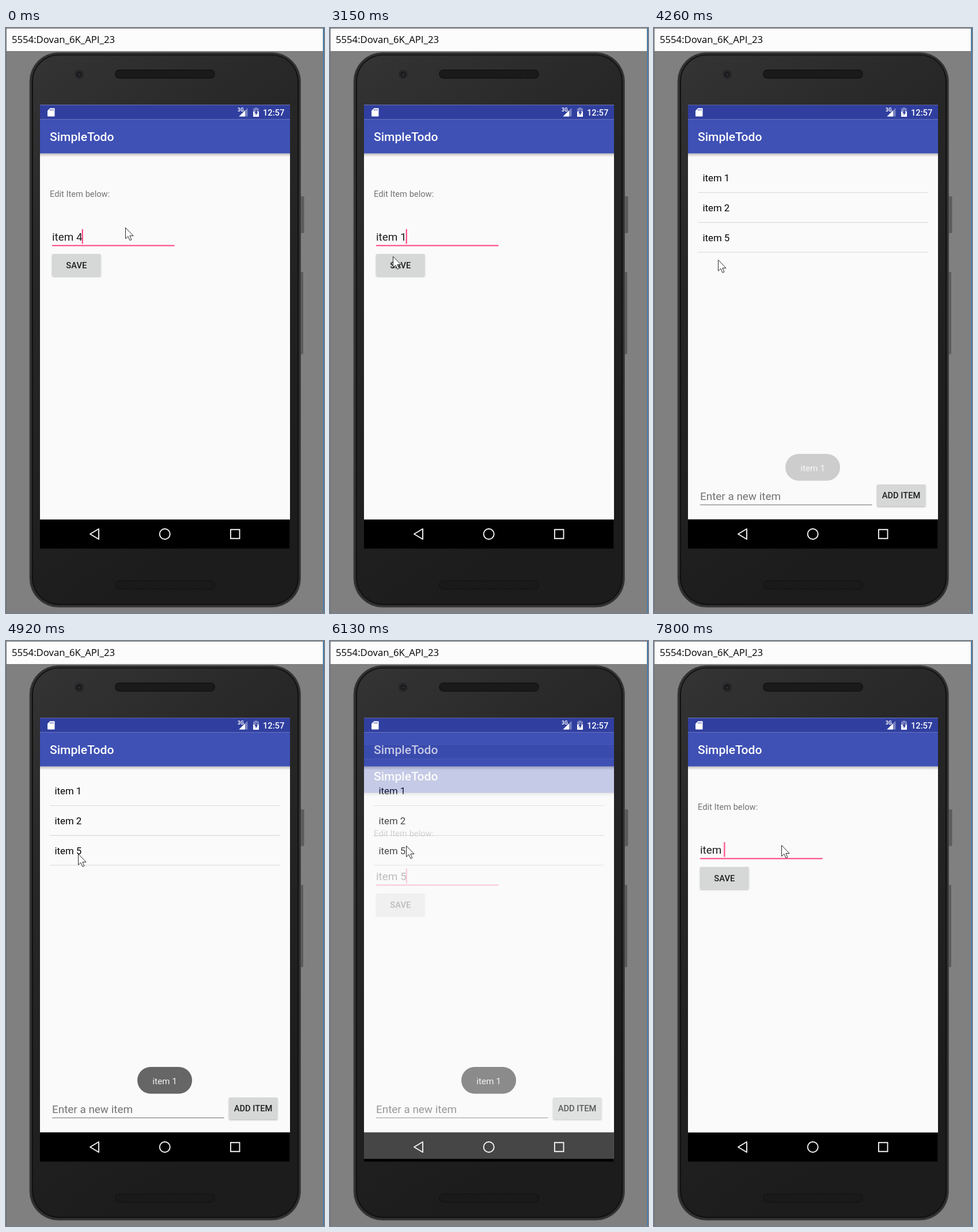
Write an HTML page that moves like this. It is 552x1015 px and loops after 8000 ms.

```html
<!DOCTYPE html>
<html lang="en">
<head>
<meta charset="utf-8">
<title>Todo app in an emulator</title>
<style>
html, body { margin: 0; width: 100%; height: 100%; overflow: hidden; background: #808080; }
svg { display: block; width: 100%; height: 100%; }
text { font-family: Roboto, sans-serif; white-space: pre; }
.medium { font-weight: 500; }
.small { font-size: 14.7px; }
.row { font-size: 16.8px; }
.field { font-size: 18.9px; }
.mid { text-anchor: middle; }
.window-title { font: 16.7px "Open Sans", "Noto Sans", sans-serif; }

.anim { animation: 8s step-end infinite; }
#pointer { animation-name: pointer; }
#caret { animation-name: caret; }
#list { animation-name: list; }
#edit { animation-name: edit; }
#toast { animation-name: toast; }
#save { animation-name: press; }
#old { animation-name: old; }
#typed { animation-name: typed; }
#next { animation-name: next; }

@keyframes pointer {
  0% { transform: translate(207px, 346px); }
  30.625% { transform: translate(207px, 343px); }
  32.125% { transform: translate(207px, 348px); }
  34% { transform: translate(114px, 376px); }
  35.875% { transform: translate(106px, 384px); }
  37.5% { transform: translate(104px, 387px); }
  39.375% { transform: translate(109px, 396px); }
  40.875% { transform: translate(111px, 400px); }
  44.25% { transform: translate(111px, 402px); }
  56.625% { transform: translate(112px, 399px); }
  58.25% { transform: translate(114px, 394px); }
  60% { transform: translate(120px, 380px); }
  61.5% { transform: translate(125px, 369px); }
  63% { transform: translate(129px, 362px); }
  64.5% { transform: translate(132px, 354px); }
  66.375% { transform: translate(132px, 365px); }
  67.875% { transform: translate(132px, 355px); }
  78.5% { transform: translate(144px, 355px); }
  80.125% { transform: translate(152px, 361px); }
  81.875% { transform: translate(166px, 370px); }
  83.375% { transform: translate(174px, 367px); }
  85.25% { transform: translate(219px, 354px); }
  87.125%, 100% { transform: translate(221px, 354px); }
}
@keyframes caret {
  0%, 23.625%, 35.875%, 76.625%, 88.625% { opacity: 1; transform: none; }
  5.375%, 17.875%, 30.625%, 42.375%, 81.875%, 95.625% { opacity: 0; transform: none; }
  10.5%, 97.5%, 100% { opacity: 1; transform: translateX(-10.4px); }
}
@keyframes old {
  0% { opacity: 1; }
  10.5%, 100% { opacity: 0; }
}
@keyframes typed {
  0%, 75.125%, 100% { opacity: 0; }
  23.625% { opacity: 1; }
}
@keyframes next {
  0%, 97.5%, 100% { opacity: 0; }
  75.125% { opacity: 1; }
}
@keyframes press {
  0%, 42.375%, 100% { fill: #d6d7d7; }
  40.875% { fill: #c6c7c7; }
}
@keyframes list {
  0%, 51.375%, 100% { opacity: 1; }
  48% { opacity: .7; }
}
@keyframes edit {
  0%, 80.125%, 100% { opacity: 1; transform: none; }
  49.5% { opacity: .92; transform: translateY(3px); }
  51.375% { opacity: 0; transform: none; }
  76.625% { opacity: .28; transform: translateY(46px); }
  78.5% { opacity: 1; transform: translateY(1px); }
}
@keyframes toast {
  0%, 80.125%, 100% { opacity: 0; }
  53.25% { opacity: .3; }
  55% { opacity: .85; }
  56.625% { opacity: 1; }
  76.625% { opacity: .75; }
  78.5% { opacity: .25; }
}
</style>
</head>
<body>
<svg viewBox="0 0 552 1015">
  <defs>
    <linearGradient id="body" x2=".35" y2="1">
      <stop stop-color="#343435"/><stop offset=".35" stop-color="#272728"/><stop offset="1" stop-color="#1c1c1c"/>
    </linearGradient>
    <linearGradient id="shade" x2="0" y2="1">
      <stop stop-color="#000" stop-opacity=".25"/><stop offset="1" stop-color="#000" stop-opacity="0"/>
    </linearGradient>
    <pattern id="holes" width="4" height="4" patternUnits="userSpaceOnUse">
      <circle cx="1" cy="1" r=".7" fill="#303030"/><circle cx="3" cy="3" r=".7" fill="#303030"/>
    </pattern>
    <filter id="raise" x="-10%" y="-10%" width="120%" height="130%">
      <feDropShadow dx="0" dy="1.2" stdDeviation=".9" flood-opacity=".28"/>
    </filter>
    <clipPath id="screen"><path d="M59 133.400H492.200V903.300H59Z"/></clipPath>
    <g id="grille">
      <rect x="189" y="72" width="174" height="16" rx="8" fill="#151515"/>
      <rect x="191" y="74" width="170" height="12" rx="6" fill="url(#holes)"/>
    </g>
    <g id="page">
      <path d="M59 133.400H493V852.400H59Z" fill="#fafafa"/>
      <path d="M59 217H493V224H59Z" fill="url(#shade)"/>
      <path d="M59 133.400H493V158.500H59Z" fill="#303f9f"/>
      <path d="M59 158.500H493V217.500H59Z" fill="#3f51b5"/>
      <text class="medium" x="76" y="196" font-size="21.050" fill="#fff">SimpleTodo</text>
    </g>
  </defs>

  <!-- emulator window -->
  <path d="M0 0H552V1015H0Z" fill="#808080"/>
  <path d="M1 1H550V40H1Z" fill="#fcfcfc"/>
  <path d="M0 .5H552M.5 0V1015" stroke="#707070"/>
  <path d="M550.5 0V1015" stroke="#6d7a86"/>
  <path d="M551.5 0V1015" stroke="#2f82c4"/>
  <text class="window-title" x="10" y="25.500">5554:Dovan_6K_API_23</text>

  <!-- handset -->
  <rect x="510" y="292" width="7.500" height="64" rx="2" fill="#5c5c5c"/>
  <rect x="510" y="423" width="6" height="143" rx="2" fill="#5c5c5c"/>
  <rect x="41" y="42.500" width="470.500" height="962.500" rx="50" fill="#2f2f2f" stroke="#4c4c4c"/>
  <rect x="45" y="46" width="463" height="955" rx="47" fill="#101010"/>
  <rect x="47" y="47.500" width="459" height="951.500" rx="45" fill="url(#body)"/>
  <use href="#grille"/>
  <use href="#grille" y="886.500"/>
  <circle cx="127" cy="80.500" r="8" fill="#262628"/>
  <circle cx="127" cy="80.500" r="4.500" fill="#19191b"/>
  <circle cx="127.500" cy="81" r="1.800" fill="#30343a"/>

  <g clip-path="url(#screen)">
    <path d="M59 133H493V904H59Z"/>

    <g id="list" class="anim">
      <use href="#page"/>
      <g class="row">
        <text x="84.500" y="266">item 1</text>
        <text x="84.500" y="318">item 2</text>
        <text x="84.500" y="369.800">item 5</text>
      </g>
      <path d="M76 285.500H475.500M76 337.300H475.500M76 389H475.500" stroke="#d9d9d9" stroke-width="1.200"/>
      <text class="field" x="80" y="819" fill="#737373">Enter a new item</text>
      <path d="M80 827.300H378.500" stroke="#878787" stroke-width="1.200"/>
      <rect x="387" y="792" width="84.500" height="38" rx="2" fill="#d6d7d7" filter="url(#raise)"/>
      <text class="small medium mid" x="429" y="816.300" fill="#1e1e1e">ADD ITEM</text>
    </g>

    <g id="edit" class="anim">
      <use href="#page"/>
      <text class="small" x="76" y="292.500" fill="#737373">Edit Item below:</text>
      <g class="field" fill="#1e1e1e">
        <text x="80" y="369">item</text>
        <text id="old" class="anim" x="122" y="369">4</text>
        <text id="typed" class="anim" x="122" y="369">1</text>
        <text id="next" class="anim" x="122" y="369">5</text>
      </g>
      <path d="M80 377.500H292.500" stroke="#ff4081" stroke-width="2.100"/>
      <path id="caret" class="anim" d="M132.700 349V374.500" stroke="#ff4081" stroke-width="2.100"/>
      <rect id="save" class="anim" x="80" y="392" width="84.500" height="38.500" rx="2" fill="#d6d7d7" filter="url(#raise)"/>
      <text class="small medium mid" x="122.300" y="416.700" fill="#1e1e1e">SAVE</text>
    </g>

    <g id="toast" class="anim" opacity="0">
      <rect x="228" y="739" width="95" height="46.500" rx="23.200" fill="#666"/>
      <text class="mid" x="275.500" y="768.500" font-size="15.300" fill="#f2f2f2">item 1</text>
    </g>

    <!-- system bars -->
    <g fill="#fff">
      <path d="M76.500 139H83.500Q84.500 139 84.500 140V152.500Q84.500 153.500 83.500 153.500H73Q72 153.500 72 152.500V143.500Z"/>
      <path d="M76.700 140.500v3M79.200 140.500v3M81.700 140.500v3" stroke="#303f9f"/>
      <text x="402" y="145.300" font-size="8.500" font-weight="700">3G</text>
      <path d="M419.500 138.500V153.500H404.500Z" opacity=".35"/>
      <path d="M415 143V153.500H404.500Z"/>
      <path d="M431.500 138H436.500V139.500H439V146H429V139.500H431.500Z" opacity=".35"/>
      <path d="M429 145H439V154H429Z"/>
      <path d="M435.500 141.500L431 147.700H433.500V152L437.300 146H435.500Z" fill="#303f9f"/>
      <text class="small medium" x="446" y="152">12:57</text>
    </g>
    <g fill="none" stroke="#f4f4f4" stroke-width="1.900">
      <path d="M161 869V887L146 878Z" stroke-linejoin="round"/>
      <circle cx="275.700" cy="878" r="9"/>
      <path d="M389.900 870.300H405.500V885.700H389.900Z"/>
    </g>
  </g>

  <g id="pointer" class="anim">
    <path d="M.5 .5V19.500L4.800 15.500 8 22.500 10.800 21.300 7.800 14.500H14Z" fill="#fff" stroke="#111" stroke-width=".9"/>
  </g>
</svg>
</body>
</html>
```
